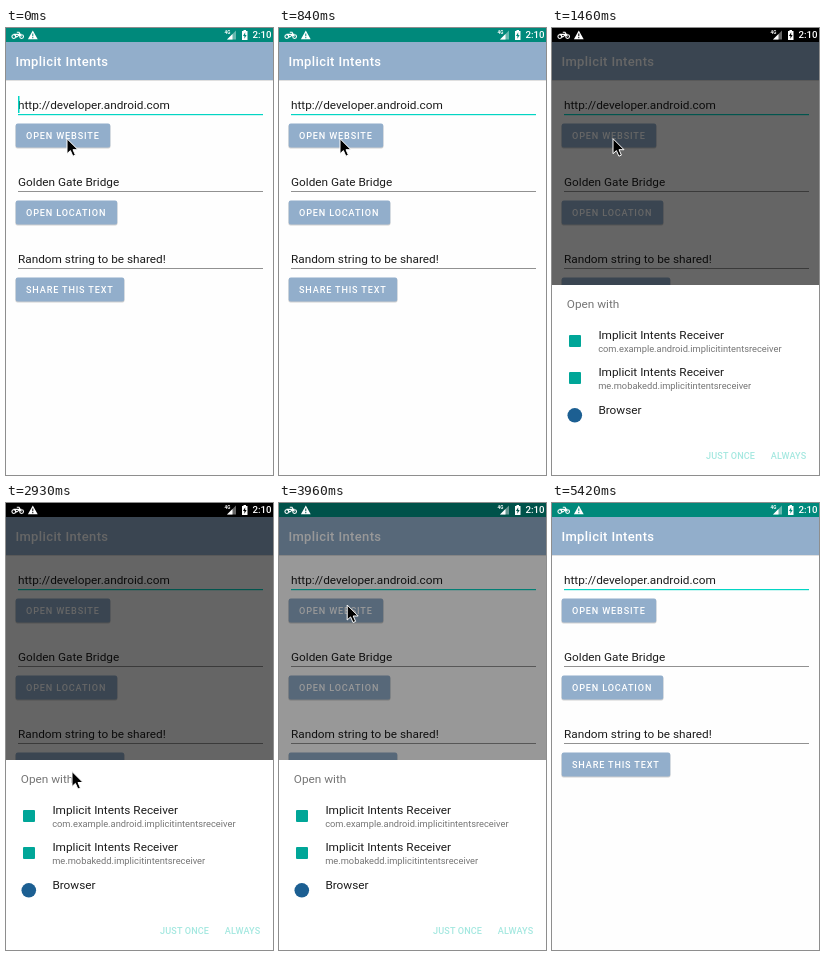
Animation of 267 by 447 pixels, one loop 5650 ms. Source, as an HTML page:

```html
<!DOCTYPE html>
<html lang="en">
<head>
<meta charset="utf-8">
<title>Implicit Intents</title>
<style>
html, body { margin: 0; width: 100%; height: 100%; overflow: hidden; background: #fefefe; }
svg { display: block; width: 100vw; height: 100vh; font: 11.8px Roboto, sans-serif; fill: #1c1c1c; }
.title { font-size: 13px; font-weight: 500; letter-spacing: .37px; fill: #fff; }
.label { font-size: 9.1px; font-weight: 500; letter-spacing: .85px; fill: #fff; }
.small { font-size: 9.3px; fill: #757575; }
.action { font-size: 9.1px; font-weight: 500; letter-spacing: .15px; fill: #a5e8e0; }
.clock { font-size: 9.7px; font-weight: 500; }
</style>
</head>
<body>
<svg viewBox="0 0 267 447">
  <rect width="267" height="447" fill="#fefefe"/>
  <rect y="51" width="267" height="2" fill="#000" opacity=".12"/>
  <rect y="14" width="267" height="38" fill="#92aecb"/>
  <rect width="267" height="14" fill="#00897b"/>
  <text class="title" x="9.4" y="38">Implicit Intents</text>
  <g id="form"></g>
  <rect id="caret" x="12" y="68" width="1.5" height="17" fill="#03d5c4"/>
  <rect id="dim" width="267" height="447" fill="#000"/>
  <rect id="blackBar" width="267" height="14" fill="#000"/>

  <g id="sheet">
    <rect y="257" width="267" height="190" fill="#fff"/>
    <text x="14.8" y="280" fill="#757575">Open with</text>
    <g id="receivers"></g>
    <circle cx="22.8" cy="387.3" r="7.3" fill="#1c5f92"/>
    <text x="46.4" y="386">Browser</text>
    <text class="action" x="154" y="431">JUST ONCE</text>
    <text class="action" x="218.7" y="431">ALWAYS</text>
  </g>

  <g fill="#fff">
    <g fill="none" stroke="#fff" stroke-width="1.1">
      <circle cx="7.8" cy="8.6" r="1.9"/>
      <circle cx="15.6" cy="8.6" r="1.9"/>
      <path d="M7.5 6.4H14L10.7 9 8.5 6.4M10.8 4.2H13L15.4 8.4"/>
    </g>
    <path fill-rule="evenodd" d="M26.8 2.6 31.7 11.3H21.9ZM26.3 5.6V8.3H27.3V5.6ZM26.3 9.1V10.2H27.3V9.1Z"/>
    <text x="218.5" y="6" font-size="4.6" font-weight="700">4G</text>
    <path d="M230 2.5V11.5H221Z" opacity=".4"/>
    <path d="M226.5 6V11.5H221Z"/>
    <path fill-rule="evenodd" d="M236 3H237.5V2H240V3H241.5V12H236ZM239.2 4.2 237 7.9H238.4V10.8L240.6 6.9H239.2Z"/>
    <text class="clock" x="246.5" y="10.3">2:10</text>
  </g>
  <path id="pointer" d="M0 0V15L3.4 11.9 5.9 17.5 8.4 16.4 6 11H11Z" fill="#000" stroke="#fff"/>
</svg>
<script>
const LOOP = 5650;
const TICK = 208.2; // the screen refreshes once per tick
const el = id => document.getElementById(id);
const clamp = v => Math.max(0, Math.min(1, v));

function formRow([text, label], i) {
  const y = 68 + 77 * i, width = 94.5 + 7 * i;
  return `
    <text x="12" y="${y + 13}">${text}</text>
    <rect x="12" y="${y + 18}" width="245" height="${i ? .9 : 1.2}" fill="${i ? "#858585" : "#03d5c4"}"/>
    <rect x="9.4" y="${y + 28.5}" width="${width + .6}" height="24" rx="2" opacity=".2"/>
    <rect x="9.7" y="${y + 27.5}" width="${width}" height="24" rx="2" fill="#92aecb"/>
    <text class="label" x="20" y="${y + 43}">${label}</text>`;
}

function receiver(owner, i) {
  const y = 311 + 37 * i;
  return `
    <rect x="17" y="${y - 4}" width="12" height="12" rx="1" fill="#00a698"/>
    <text x="46.4" y="${y}">Implicit Intents Receiver</text>
    <text class="small" x="46.2" y="${y + 13}">${owner}.implicitintentsreceiver</text>`;
}

el("form").innerHTML = [
  ["http://developer.android.com", "OPEN WEBSITE"],
  ["Golden Gate Bridge", "OPEN LOCATION"],
  ["Random string to be shared!", "SHARE THIS TEXT"],
].map(formRow).join("");
el("receivers").innerHTML = ["com.example.android", "me.mobakedd"].map(receiver).join("");

// Ticks at which the dialog starts to open and has closed
const dialogs = [{ open: 0, close: 2.275 }, { open: 5.5, close: 19.67 }];

// Pointer stops: tick, x, y
const stops = [
  [0, 61, 110.7], [14, 66, 268.5], [15, 131.5, 338.5], [16, 82.5, 131.5],
  [17, 67.5, 98.5], [18, 68.2, 102], [21, 67, 230], [22, 135, 432.5],
];

function draw() {
  const n = Math.floor(performance.now() % LOOP / TICK);
  const { open, close } = dialogs.findLast(d => n >= d.open);
  const shown = clamp(Math.min(n - open, close - n));
  const opacity = clamp(shown * 1.5);
  const leaving = n > close - 1;
  const [, x, y] = stops.findLast(stop => n >= stop[0]);
  const caretOn = n < 4 || n === 24 || n === 25;

  el("dim").setAttribute("opacity", .6 * shown);
  el("blackBar").setAttribute("opacity", shown && !leaving ? 1 : 0);
  el("sheet").setAttribute("opacity", opacity);
  el("sheet").setAttribute("transform", `translate(0 ${Math.round(22 * (1 - opacity))})`);
  el("pointer").setAttribute("transform", `translate(${x} ${y})`);
  el("pointer").setAttribute("opacity", n < 23 ? 1 : 0);
  el("caret").setAttribute("opacity", caretOn ? 1 : 0);
  requestAnimationFrame(draw);
}
draw();
</script>
</body>
</html>
```
